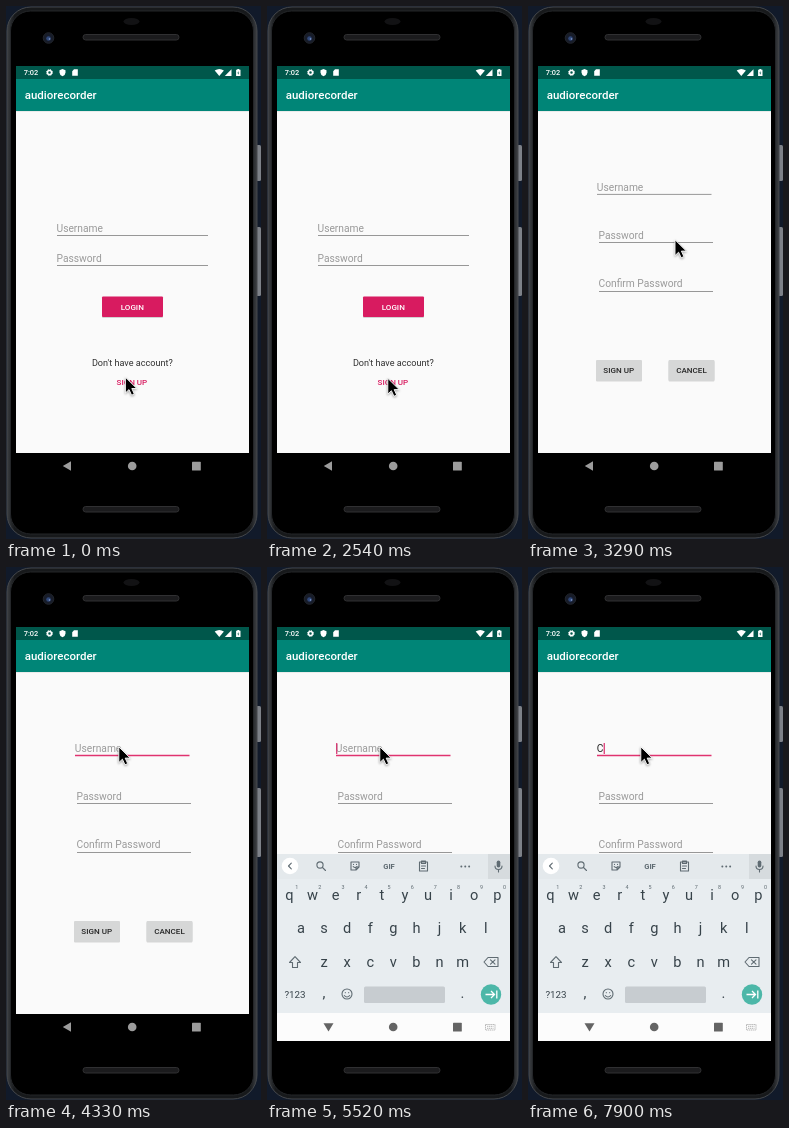
Animation of 255x533 px, one loop 8 s. Source, as an HTML page:

```html
<!DOCTYPE html>
<html lang="en">
<head>
<meta charset="utf-8">
<title>Sign up screen</title>
<style>
  html, body { margin: 0; width: 100%; height: 100%; overflow: hidden; background: #111a2a; }
  svg { display: block; width: 100%; height: 100%; font-family: Roboto, sans-serif; }
  .title { font-size: 11.5px; font-weight: 500; fill: #fff; }
  .hint { font-size: 10.25px; fill: #9a9a9a; }
  .caps { font-size: 8.05px; font-weight: 500; text-anchor: middle; }
  .line { stroke: #8d8d8d; stroke-width: .9; }
  .key { font-size: 14.6px; fill: #37434a; text-anchor: middle; }
  .digit { font-size: 5.4px; fill: #5c686f; text-anchor: middle; }
  .icon { fill: none; stroke: #5f6b72; stroke-width: 1.1; stroke-linejoin: round; stroke-linecap: round; }
  #cursor { filter: drop-shadow(0 1.5px 1px rgba(0, 0, 0, .35)); }
</style>
</head>
<body>
<svg viewBox="0 0 255 533">
  <defs>
    <clipPath id="screen"><rect x="10" y="60" width="233" height="414"/></clipPath>
    <clipPath id="reveal"><rect id="revealRect" x="10" y="60" width="233" height="414"/></clipPath>
    <linearGradient id="rim" x2="1" y2="0">
      <stop offset="0" stop-color="#3b3e42"/><stop offset=".03" stop-color="#17191b"/>
      <stop offset=".97" stop-color="#17191b"/><stop offset="1" stop-color="#3b3e42"/>
    </linearGradient>
    <g id="appBar">
      <rect x="10" y="60" width="233" height="387" fill="#fafafa"/>
      <rect x="10" y="60" width="233" height="13" fill="#00574b"/>
      <rect x="10" y="73" width="233" height="32" fill="#008577"/>
      <rect x="10" y="105" width="233" height="1" fill="#000" opacity=".06"/>
      <text class="title" x="18.7" y="93.4">audiorecorder</text>
    </g>
  </defs>

  <!-- phone body -->
  <rect x="250" y="139" width="5" height="36" rx="1.5" fill="#7d8188"/>
  <rect x="250" y="221" width="5" height="69" rx="1.5" fill="#7d8188"/>
  <rect x="1" y="1" width="250" height="531" rx="24" fill="url(#rim)" stroke="#44474b"/>
  <rect x="4.5" y="5" width="243" height="523" rx="20" fill="#000" stroke="#242629"/>
  <ellipse cx="125.500" cy="15.500" rx="8" ry="3.500" fill="#121214"/>
  <circle cx="42.500" cy="32" r="5.300" fill="#171c29" stroke="#22252b"/>
  <circle cx="42.500" cy="32.500" r="2.300" fill="#2f4778"/>
  <circle cx="43.500" cy="33" r=".8" fill="#90a5d0"/>
  <g fill="#1b1b1d" stroke="#303032">
    <rect x="77" y="28.500" width="96" height="5.500" rx="2.700"/>
    <rect x="77" y="500.500" width="96" height="5.500" rx="2.700"/>
  </g>

  <g clip-path="url(#screen)">
    <rect x="10" y="446" width="233" height="28" fill="#000"/>

    <g id="login">
      <use href="#appBar"/>
      <text class="hint" x="50.500" y="225.500">Username</text>
      <path class="line" d="M51 229.500H202"/>
      <text class="hint" x="50.500" y="255.500">Password</text>
      <path class="line" d="M51 259.500H202"/>
      <rect x="96" y="291.500" width="61" height="20.500" rx="1" fill="#000" opacity=".16"/>
      <rect x="96" y="290.500" width="61" height="20.500" rx="1" fill="#d81b60"/>
      <text class="caps" x="126.300" y="303.800" fill="#fff">LOGIN</text>
      <text x="126.300" y="360.200" font-size="9.1" text-anchor="middle" fill="#303030">Don't have account?</text>
      <rect id="press" x="106" y="368" width="39" height="14" fill="#dedede"/>
      <text class="caps" x="125.900" y="379.200" fill="#d81b60">SIGN UP</text>
    </g>
    <rect id="dim" x="10" y="60" width="233" height="414" opacity=".1"/>

    <g id="signupClip" clip-path="url(#reveal)">
      <g id="signup">
        <use href="#appBar"/>
        <text id="nameText" class="hint" x="68.800" y="184.500"></text>
        <path id="nameLine" class="line"/>
        <rect id="caret" y="176" width="1.100" height="11" fill="#d81b60"/>
        <text class="hint" x="70.500" y="232.500">Password</text>
        <path class="line" d="M71 236.500H185"/>
        <text class="hint" x="70.500" y="281.300">Confirm Password</text>
        <path class="line" d="M71 285.500H185"/>
        <g fill="#000" opacity=".14">
          <rect x="68" y="355" width="46" height="20.500" rx="1"/>
          <rect x="140.500" y="355" width="46" height="20.500" rx="1"/>
        </g>
        <g fill="#d6d7d7">
          <rect x="68" y="354" width="46" height="20.500" rx="1"/>
          <rect x="140.500" y="354" width="46" height="20.500" rx="1"/>
        </g>
        <text class="caps" x="90.700" y="367" fill="#262626">SIGN UP</text>
        <text class="caps" x="163.500" y="367" fill="#262626">CANCEL</text>
      </g>
    </g>

    <g id="keyboard">
      <rect x="10" y="287" width="233" height="159" fill="#e8edf0"/>
      <rect x="10" y="287" width="233" height="25" fill="#e4e9ec"/>
      <rect x="221" y="287" width="22" height="25" fill="#d6dbde"/>
      <rect x="10" y="446" width="233" height="30" fill="#fcfcfc"/>
      <circle cx="23" cy="299" r="8.300" fill="#fff"/>
      <path id="chevron" class="icon" d="M24.300 296.200L21.500 299L24.300 301.800"/>
      <g id="tools" class="icon">
        <circle cx="53" cy="298" r="3.100"/><path d="M55.500 300.500L58.500 303.500"/>
        <path d="M84 295H92V300L89 303H84ZM92 300H89V303M86.200 299.500Q88 301.500 89.800 299.500M86.500 297.300V297.500M89.500 297.300V297.500"/>
        <text x="122" y="302" font-size="7.600" font-weight="700" text-anchor="middle" fill="#5f6b72" stroke="none">GIF</text>
        <path d="M152.500 295H160.500V304H152.500ZM154.500 295V296.500H158.500V294H154.500ZM154.500 299H158.500M154.500 301.500H157.500"/>
        <path d="M194.300 299.500H194.400M198.200 299.500H198.300M202.100 299.500H202.200" stroke-width="1.900"/>
      </g>
      <rect x="229.700" y="293.500" width="3.600" height="7" rx="1.800" fill="#5f6b72"/>
      <path class="icon" d="M228 299Q228 302.500 231.500 302.500T235 299M231.500 302.500V305"/>
      <g id="keys"></g>
      <path class="icon" d="M28 389.700L22.500 395.500H25.500V400.500H30.500V395.500H33.500Z"/>
      <path class="icon" d="M217 395L221 390.500H231V399.500H221ZM223.500 392.800L228 397.200M228 392.800L223.500 397.200"/>
      <text class="key" x="28" y="430.700" style="font-size:9.800px">?123</text>
      <circle class="icon" cx="80" cy="427" r="5"/>
      <path class="icon" d="M77.300 428.500Q80 431.500 82.700 428.500M78.300 425.500V425.700M81.700 425.500V425.700"/>
      <rect x="97" y="419.500" width="81" height="16.500" rx="1.500" fill="#c7ccd0"/>
      <circle cx="224" cy="427.500" r="10.200" fill="#4cb7a8"/>
      <path d="M218.500 427.500H227M224 424L227.500 427.500L224 431M229.800 423.500V431.500" fill="none" stroke="#fff" stroke-width="1.300"/>
    </g>

    <g id="nav">
      <path id="back"/>
      <circle cx="126.200" cy="460" r="4.300"/>
      <rect x="186" y="455.700" width="8.800" height="8.800" rx=".6"/>
      <path id="imeSwitch" d="M218.500 457.500H228V463H218.500ZM220 459.300H226.500M220 461.300H226.500" fill="none" stroke="#b5b5b5" stroke-dasharray="1.300 .6"/>
    </g>

    <!-- status icons -->
    <g fill="#fff">
      <text x="17.700" y="69.400" font-size="7.400" font-weight="500">7:02</text>
      <circle cx="43.500" cy="66.500" r="2" fill="none" stroke="#fff" stroke-width="1.500"/>
      <circle cx="43.500" cy="66.500" r="3" fill="none" stroke="#fff" stroke-dasharray="1.200 1.160"/>
      <path d="M56.500 63L59.500 64.200V66.500Q59.500 69 56.500 70.300Q53.500 69 53.500 66.500V64.200Z"/>
      <path d="M68 63.300H71.800V69.700H66.200V65.200Z"/>
      <path d="M208.700 64.500Q213.300 61.500 217.900 64.500L213.300 70Z"/>
      <path d="M225.500 63.300V70H218.800Z"/>
      <path d="M231.300 63H233.300V63.800H234.500V70H230.100V63.800H231.300Z"/>
      <path d="M232.600 65L231.300 67.200H232.300L232 69L233.300 66.700H232.400Z" fill="#00574b"/>
    </g>
  </g>

  <path id="cursor" d="M0 0V15.800L3.600 12.400L6.200 18L8.900 16.800L6.400 11.300H11.400Z" stroke="#fff" stroke-width=".9"/>
</svg>

<script>
const LOOP = 8000;
const $ = id => document.getElementById(id);
const set = (id, attrs) => {
  for (const name in attrs) $(id).setAttribute(name, attrs[name]);
};
const show = (id, on) => set(id, { display: on ? "inline" : "none" });

// Each track is a list of [start, value...]; a value holds until the next start.
const tracks = {
  cursor: [[0, 119.4, 371.2], [900, 119.2, 371.8], [1200, 119.8, 371.8], [1500, 120.2, 372],
           [1790, 120.8, 372.3], [3140, 134, 310], [3290, 147, 233.8], [3440, 142, 208],
           [3590, 131, 192], [3740, 121, 184], [3890, 115, 181], [4030, 112.8, 179.8]],
  keyboard: [[0, 0, 0], [4480, 8, .82], [4620, 0, 1]],   // offset, opacity
  caret: [[0, 0], [4480, 1], [5070, 0], [5520, 1], [6120, 0], [6570, 1]],
  typed: [[0, ""], [7010, "c"], [7460, ""], [7900, "C"]],
  tools: [[0, 1], [7160, 0], [7610, .45], [7760, 1]]
};
const at = (name, t) => tracks[name].filter(step => step[0] <= t).pop().slice(1);

function buildKeys() {
  const pitch = 23.1;
  const rows = [["qwertyuiop", 22.4, 332.7], ["asdfghjkl", 34, 366], ["zxcvbnm", 57, 399.5]];
  let markup = "";
  const add = (style, x, y, label) =>
    markup += `<text class="${style}" x="${x}" y="${y}">${label}</text>`;
  for (const [letters, left, y] of rows)
    [...letters].forEach((letter, i) => {
      add("key", left + i * pitch, y, letter);
      if (letters.length === 10) add("digit", left + 7.3 + i * pitch, 322, (i + 1) % 10);
    });
  add("key", 57, 431, ",");
  add("key", 195.5, 431, ".");
  $("keys").innerHTML = markup;
}

function render(t) {
  const [x, y] = at("cursor", t);
  set("cursor", { transform: `translate(${x} ${y})` });

  // The sign-up page rises over the login page, which moves up and darkens.
  const signup = t >= 2990, entering = signup && t < 3140;
  show("press", t >= 2240 && t < 2540);
  show("login", !signup || entering);
  show("dim", entering);
  show("signupClip", signup);
  set("login", { transform: `translate(0 ${entering ? -5 : 0})` });
  set("signup", { transform: `translate(0 ${entering ? 6 : 0})` });
  set("revealRect", { y: entering ? 98 : 60 });

  const focused = t >= 4330;
  const [typed] = at("typed", t);
  $("nameText").textContent = typed || "Username";
  $("nameText").style.fill = typed ? "#252525" : "";
  $("nameLine").style.cssText = focused ? "stroke:#e0336f;stroke-width:1.5" : "";
  set("nameLine", { d: "M69 188.400H183.500" });
  set("caret", { x: typed ? 69 + $("nameText").getComputedTextLength() : 69.2 });
  show("caret", at("caret", t)[0]);

  const [offset, opacity] = at("keyboard", t);
  set("keyboard", { transform: `translate(0 ${offset})`, opacity });
  const [tools] = at("tools", t);
  set("tools", { opacity: tools });
  set("chevron", { transform: tools ? "" : "rotate(180 23 299)" });

  set("nav", { fill: opacity ? "#646464" : "#9c9c9c" });
  set("back", { d: opacity ? "M56.500 456.300H66.500L61.500 464.500Z" : "M65 455.200V464.800L56.800 460Z" });
  show("imeSwitch", opacity);
}

buildKeys();
(function tick() {
  render(performance.now() % LOOP);
  requestAnimationFrame(tick);
})();
</script>
</body>
</html>
```
